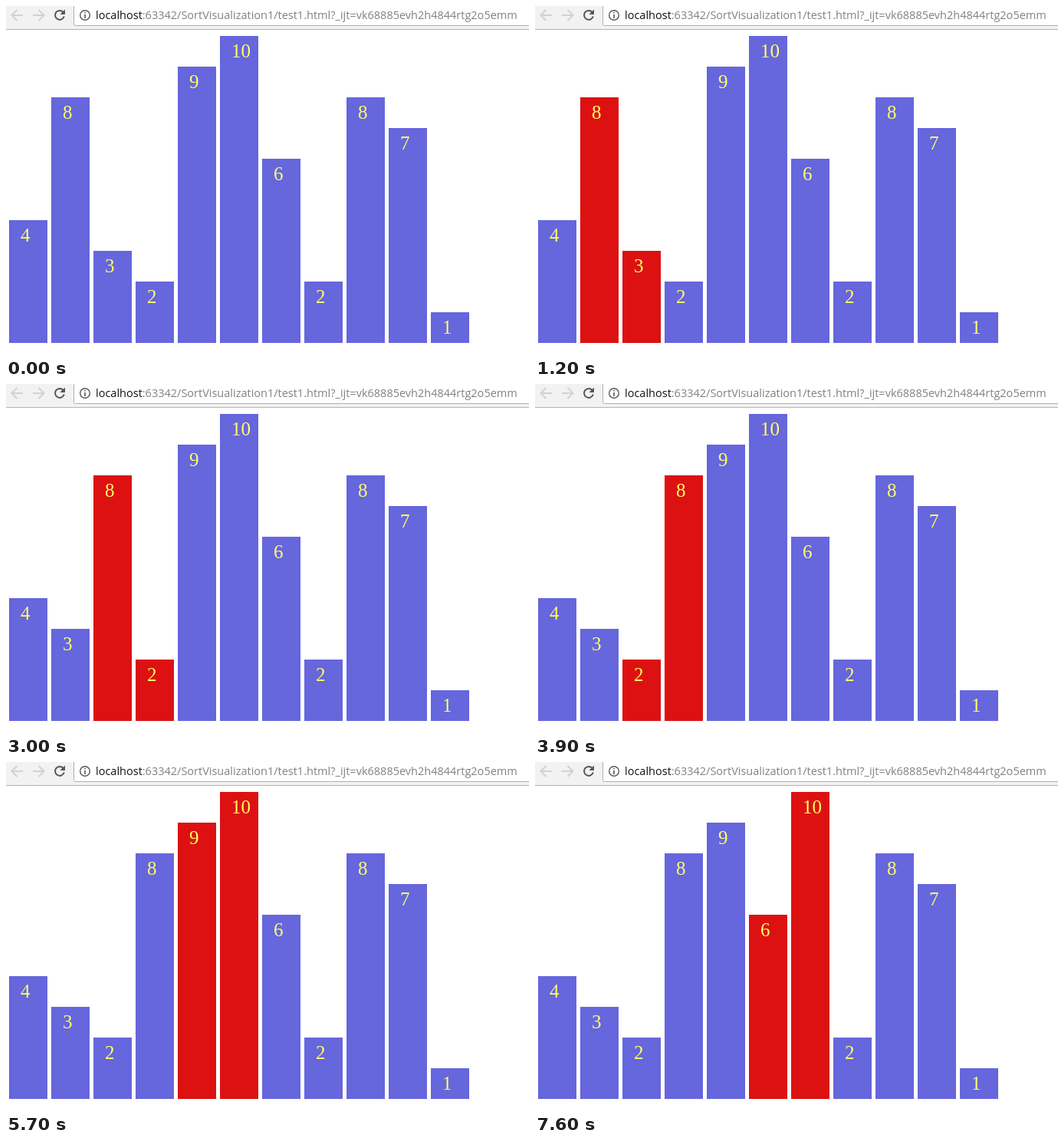
Write an HTML page that moves like this. It is 682 px wide and 456 px high and loops after 8 s.

```html
<!DOCTYPE html>
<html lang="en">
<head>
<meta charset="utf-8">
<title>Bubble sort</title>
<style>
html, body { margin: 0; height: 100%; overflow: hidden; background: #fff; }
svg { display: block; }
.url { font: 14.5px "Open Sans", "Noto Sans", sans-serif; fill: #808080; }
.bars text { font: 25px "Liberation Serif", serif; fill: #ff6; }
</style>
</head>
<body>
<svg width="682" height="456" viewBox="0 0 682 456">
  <rect width="682" height="30" fill="#f2f2f2"/>
  <path d="M0 30.5H682" stroke="#b4b4b4"/>
  <path d="M88.5 -1V23.5Q88.5 25.5 90.5 25.5H683V-1Z" fill="#fff" stroke="#b0b0b0"/>
  <g fill="none" stroke="#d2d2d2" stroke-width="2">
    <path d="M22 12H8M14.5 5L7.5 12L14.5 19"/>
    <path d="M35 12H49M42.5 5L49.5 12L42.5 19"/>
  </g>
  <path d="M74.6 8A6 6 0 1 0 75.8 13.5" fill="none" stroke="#555" stroke-width="2"/>
  <path d="M77 4.5V11H70.5Z" fill="#555"/>
  <circle cx="103" cy="12" r="6.3" fill="none" stroke="#555" stroke-width="1.4"/>
  <path d="M103 8V9.6M103 11V16" stroke="#555" stroke-width="1.6"/>
  <text class="url" x="117" y="17"><tspan fill="#111">localhost</tspan>:63342/SortVisualization1/test1.html?_ijt=vk68885evh2h4844rtg2o5emm</text>
  <g class="bars"></g>
</svg>
<script>
const LOOP = 8000, BASE = 439, UNIT = 40;
const values = [4, 8, 3, 2, 9, 10, 6, 2, 8, 7, 1];
// [time, left index of the compared pair, swap?]
const steps = [
  [300, 0], [1200, 1], [2100, 1, true], [3000, 2], [3900, 2, true],
  [4800, 3], [5700, 4], [6600, 5], [7600, 5, true]
];
const group = document.querySelector(".bars");
let shown = -1;

function draw(count) {
  const list = [...values];
  let pair = -9;
  for (const [, i, swap] of steps.slice(0, count)) {
    pair = i;
    if (swap) [list[i], list[i + 1]] = [list[i + 1], list[i]];
  }
  group.innerHTML = list.map((v, i) => {
    const x = 4 + 55 * i, h = v * UNIT, y = BASE - h;
    const fill = i === pair || i === pair + 1 ? "#dd1111" : "#6666dd";
    return `<rect x="${x}" y="${y}" width="50" height="${h}" fill="${fill}"/>` +
      `<text x="${x + 15}" y="${y + 28}">${v}</text>`;
  }).join("");
}

const start = performance.now();
function tick() {
  const t = (performance.now() - start) % LOOP;
  const count = steps.filter(s => s[0] <= t).length;
  if (count !== shown) draw(shown = count);
  requestAnimationFrame(tick);
}
tick();
</script>
</body>
</html>
```
